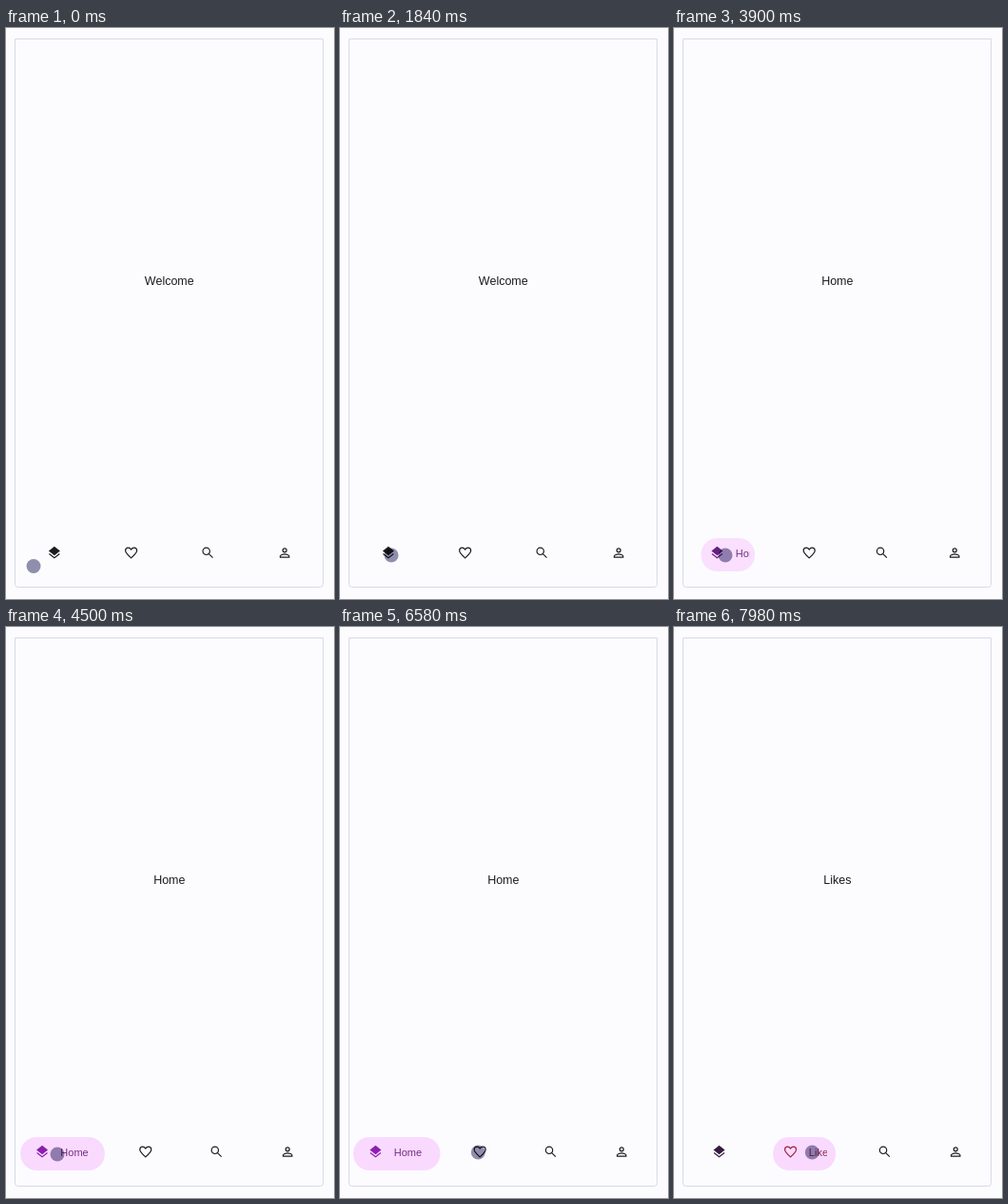
Write an HTML page with a canvas that moves like this. It is 345 by 600 pixels and loops after 8 s.

```html
<!DOCTYPE html>
<html lang="en">
<head>
<meta charset="utf-8">
<title>Navigation bar</title>
<style>
  html, body { margin: 0; width: 100%; height: 100%; overflow: hidden; background: #fcfcff; }
  canvas { display: block; width: 345px; height: 600px; }
</style>
</head>
<body>
<canvas id="stage"></canvas>
<script>
const W = 345, H = 600, LOOP = 8000;
const TAP_HOME = 3340, TAP_LIKES = 7300, DURATION = 1450;
const NAV = { left: 10, width: 323, top: 536, height: 35, mid: 551.5, gap: 4 };
const FONT = '"Liberation Sans", Arial, sans-serif';
const INK = [28, 27, 30];

const canvas = document.getElementById('stage');
const ctx = canvas.getContext('2d');
const dpr = window.devicePixelRatio || 1;
canvas.width = W * dpr;
canvas.height = H * dpr;

const clamp = v => Math.min(1, Math.max(0, v));
const mix = (a, b, k) => a + (b - a) * k;
const rgb = (a, b, k) => `rgb(${a.map((v, i) => Math.round(mix(v, b[i], k))).join(',')})`;

// cubic-bezier(.25, .1, .25, 1)
function ease(x) {
  if (x <= 0) return 0;
  if (x >= 1) return 1;
  const curve = (s, p, q) => 3 * s * (1 - s) ** 2 * p + 3 * s * s * (1 - s) * q + s ** 3;
  let lo = 0, hi = 1;
  for (let i = 0; i < 24; i++) {
    const s = (lo + hi) / 2;
    if (curve(s, .25, .25) < x) lo = s; else hi = s;
  }
  return curve(lo, .1, 1);
}

// Icons live in a 24-unit box
const heart = new Path2D('M12 20C6 14.6 3 11.9 3 8.5C3 6 5 4 7.5 4C9.3 4 11 5 12 6.7C13 5 14.7 4 16.5 4C19 4 21 6 21 8.5C21 11.9 18 14.6 12 20Z');
const layerTop = new Path2D('M12 2L21 9L12 16L3 9Z');
const layerBase = new Path2D('M3.8 13.4L12 19.8L20.2 13.4');
const lens = new Path2D('M15 9.5A5.5 5.5 0 1 1 4 9.5A5.5 5.5 0 1 1 15 9.5M13.6 13.6L19.7 19.7');
const person = new Path2D('M15 8A3 3 0 1 1 9 8A3 3 0 1 1 15 8M5 19V17C5 15.5 9 14 12 14C15 14 19 15.5 19 17V19Z');

const tabs = [
  { label: 'Home', tint: [140, 32, 176], text: '#70307f', fill: [layerTop], stroke: [layerBase] },
  { label: 'Likes', tint: [196, 40, 78], text: '#8c3058', fill: [], stroke: [heart] },
  { label: 'Search', tint: INK, text: '#1c1b1e', fill: [], stroke: [lens] },
  { label: 'Profile', tint: INK, text: '#1c1b1e', fill: [], stroke: [person] }
];

// time, x, y
const pointerKeys = [
  [0, 29, 565.5], [280, 29, 565.5], [840, 41.5, 560], [1000, 42, 559.7], [1800, 54, 554],
  [5020, 54, 554], [5300, 86, 553], [5620, 123, 552], [5760, 130, 551.5], [5860, 133, 551.5],
  [6300, 145.3, 552], [LOOP, 145.3, 552]
];

function pointerAt(t) {
  const i = pointerKeys.findIndex(k => k[0] > t);
  const a = pointerKeys[i - 1], b = pointerKeys[i];
  const k = (t - a[0]) / (b[0] - a[0]);
  return [mix(a[1], b[1], k), mix(a[2], b[2], k)];
}

function box(x, y, w, h, r, color) {
  ctx.fillStyle = color;
  ctx.beginPath();
  ctx.roundRect(x, y, w, h, Math.min(r, w / 2));
  ctx.fill();
}

function drawIcon(tab, x, color) {
  ctx.save();
  ctx.translate(x, NAV.mid);
  ctx.scale(2 / 3, 2 / 3);
  ctx.translate(-12, -12);
  ctx.fillStyle = ctx.strokeStyle = color;
  ctx.lineWidth = 1.8;
  tab.fill.forEach(p => ctx.fill(p));
  tab.stroke.forEach(p => ctx.stroke(p));
  ctx.restore();
}

function drawTab(tab, left, width, state) {
  const { active, closing, sinceTap } = state;
  const mid = left + width / 2;
  const full = width - 2 * NAV.gap;

  if (active > 0) {
    const w = full * active;
    ctx.globalAlpha = clamp(active * 1.8 - .4);
    box(mid - w / 2, NAV.top, w, NAV.height, 17, '#fad9ff');
    ctx.globalAlpha = 1;
  }

  // Room the label takes pushes the icon left of the middle
  const labelOut = closing ? clamp(1 - sinceTap / 180) : 1;
  const shift = closing ? 13.5 * active + 9.3 * labelOut : 22.8 * active ** 1.6;
  const iconX = mid + .5 - shift;
  drawIcon(tab, iconX, rgb(INK, tab.tint, active));

  const shown = closing ? labelOut : active ** 1.8;
  if (active > 0 && shown > 0) {
    ctx.save();
    ctx.beginPath();
    ctx.rect(iconX + 19, NAV.top, 31 * shown, NAV.height);
    ctx.clip();
    ctx.font = '11px ' + FONT;
    ctx.textAlign = 'left';
    ctx.fillStyle = tab.text;
    ctx.fillText(tab.label, iconX + 19.3, 556);
    ctx.restore();
  }

  if (!closing && sinceTap >= 0 && sinceTap < 420) {
    const a = .34 * clamp((420 - sinceTap) / 120);
    box(left + NAV.gap, NAV.top, full, NAV.height, 2, `rgba(0,122,255,${a})`);
  }
}

function draw(t) {
  ctx.setTransform(dpr, 0, 0, dpr, 0, 0);
  ctx.fillStyle = '#fcfcff';
  ctx.fillRect(0, 0, W, H);

  ctx.strokeStyle = '#d9d9e6';
  ctx.lineWidth = 1;
  ctx.beginPath();
  ctx.roundRect(9.5, 11.5, 324, 576, [0, 0, 3, 3]);
  ctx.stroke();

  ctx.font = '12.5px ' + FONT;
  ctx.textAlign = 'center';
  ctx.fillStyle = '#1c1b1e';
  const title = t < TAP_HOME ? 'Welcome' : t < TAP_LIKES ? 'Home' : 'Likes';
  ctx.fillText(title, 171.8, 270.3);

  const home = ease((t - TAP_HOME) / DURATION);
  const likes = ease((t - TAP_LIKES) / DURATION);
  const leaving = t >= TAP_LIKES;
  const idle = { active: 0, closing: false, sinceTap: -1 };
  const states = [
    { active: home * (1 - likes), closing: leaving, sinceTap: t - (leaving ? TAP_LIKES : TAP_HOME) },
    { active: likes, closing: false, sinceTap: t - TAP_LIKES },
    idle, idle
  ];

  const weights = states.map(s => 1 + s.active / 3);
  const total = weights.reduce((a, b) => a + b);
  let left = NAV.left;
  tabs.forEach((tab, i) => {
    const width = NAV.width * weights[i] / total;
    drawTab(tab, left, width, states[i]);
    left += width;
  });

  const [x, y] = pointerAt(t);
  ctx.globalCompositeOperation = 'multiply';
  ctx.fillStyle = '#9290ad';
  ctx.beginPath();
  ctx.arc(x, y, 7.5, 0, 2 * Math.PI);
  ctx.fill();
  ctx.globalCompositeOperation = 'source-over';
}

const start = performance.now();
function tick() {
  draw((performance.now() - start) % LOOP);
  requestAnimationFrame(tick);
}
tick();
</script>
</body>
</html>
```
